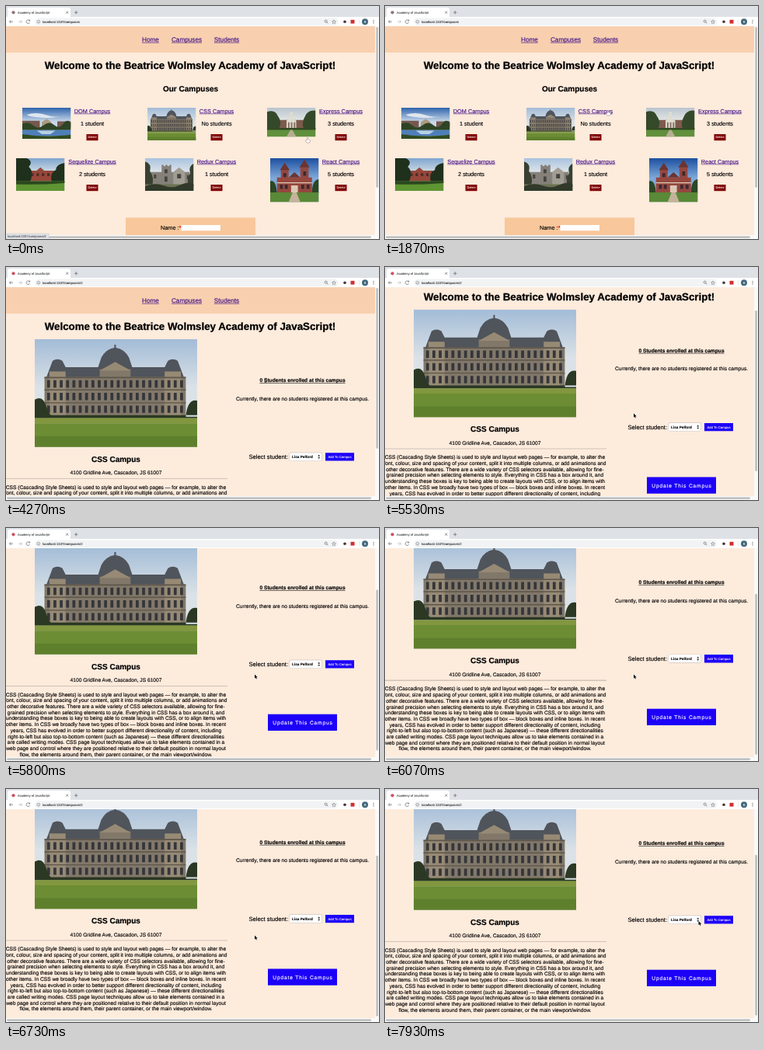
Write an HTML page with a canvas that moves like this. It is 480 px wide and 300 px high and loops after 8 s.

```html
<!DOCTYPE html>
<html lang="en">
<head>
<meta charset="utf-8">
<title>Academy of JavaScript</title>
<style>
html, body { margin: 0; width: 100%; height: 100%; overflow: hidden; }
canvas { display: block; width: 480px; height: 300px; }
</style>
</head>
<body>
<canvas id="stage"></canvas>
<script>
const LOOP = 8000;
const canvas = document.getElementById('stage');
const ctx = canvas.getContext('2d');
const ratio = window.devicePixelRatio || 1;
canvas.width = 480 * ratio;
canvas.height = 300 * ratio;

const PEACH = '#fdebdc', HEADER = '#f8d0af', LINK = '#45148a', BLUE = '#1c00f8';
const VIEW = { top: 26, right: 475, bottom: 295 };

// ---------- helpers ----------
function rect(color, x, y, w, h, radius = 0) {
  ctx.fillStyle = color;
  ctx.beginPath();
  ctx.roundRect(x, y, w, h, radius);
  ctx.fill();
}

function circle(color, x, y, r) {
  ctx.fillStyle = color;
  ctx.beginPath();
  ctx.arc(x, y, r, 0, 7);
  ctx.fill();
}

function line(path, color = '#5f6368', width = 0.7) {
  ctx.strokeStyle = color;
  ctx.lineWidth = width;
  ctx.stroke(new Path2D(path));
}

// y is the middle of the capital letters; a hairline stroke gives the heavier smoothing
function text(str, x, y, size, { color = '#000', bold, align = 'center', underline, spacing = 0 } = {}) {
  ctx.font = `${bold ? 'bold ' : ''}${size}px "Liberation Sans", Arial, sans-serif`;
  ctx.letterSpacing = spacing + 'px';
  ctx.textAlign = align;
  ctx.fillStyle = ctx.strokeStyle = color;
  ctx.lineWidth = size * 0.02;
  const base = y + size * 0.36;
  ctx.fillText(str, x, base);
  ctx.strokeText(str, x, base);
  if (underline) {
    const w = ctx.measureText(str).width;
    ctx.fillRect(align === 'center' ? x - w / 2 : x, base + size * 0.1, w, size * 0.085);
  }
  ctx.letterSpacing = '0px';
}

const clamp = v => Math.min(1, Math.max(0, v));
const ease = v => v * v * (3 - 2 * v);
const between = (t, a, b) => ease(clamp((t - a) / (b - a)));

// ---------- photos, drawn in a 100 x 100 box ----------
const box = (x, y, w, h) => `M${x} ${y}h${w}v${h}h${-w}z`;

const scenes = {
  dom: { sky: ['#2f64ad', '#c9d8e8'], shapes: [
    ['#dfe6ee', 'M10 22Q30 12 50 24T95 20Q70 36 40 32T10 22'],
    ['#75584c', box(0, 42, 36, 22) + box(72, 44, 28, 20)],
    ['#ab9a80', 'M40 62V46L50 36L60 46V62z'],
    ['#2d4424', 'M0 52Q12 42 22 56T44 56T66 56T84 52T100 48V72H0z'],
    ['#4f7fb9', 'M0 72H100V88Q50 96 0 86z'],
    ['#b8cfe4', 'M30 74H68L58 85H40z'],
    ['#314b22', 'M0 85Q50 97 100 87V100H0z']] },
  express: { sky: ['#b9c5cf', '#e3e6e4'], shapes: [
    ['#7d5a4c', box(22, 42, 56, 30)],
    ['#dfdccf', 'M40 44L50 34L60 44V72H40z' + box(47, 14, 6, 22)],
    ['#836d62', box(43, 50, 3, 20) + box(49, 50, 3, 20) + box(55, 50, 3, 20)],
    ['#34492a', 'M0 14Q16 4 22 28Q32 48 24 74H0zM100 10Q84 6 78 30Q70 52 76 74H100z'],
    ['#61903d', box(0, 70, 100, 30)],
    ['#314922', box(0, 69, 100, 7)],
    ['#b6ae92', 'M48 76H52L60 100H40z']] },
  sequelize: { sky: ['#7ea5cf', '#d3dde5'], shapes: [
    ['#96473a', 'M26 70V38H42L50 28L58 38H78V70z'],
    ['#4d2b28', box(31, 46, 5, 9) + box(42, 46, 5, 9) + box(53, 46, 5, 9) + box(64, 46, 5, 9)],
    ['#1f301c', 'M0 0H22Q36 10 26 26Q38 42 28 74H0zM100 14Q82 18 82 36Q68 46 74 74H100z'],
    ['#5f9432', box(0, 70, 100, 30)],
    ['#2b481e', 'M0 70H100V76Q50 82 0 80z']] },
  redux: { sky: ['#a9c3df', '#e0e6ea'], shapes: [
    ['#85817a', 'M10 82V42H34V20H38V24H42V20H46V24H50V20H54V42H92V82z'],
    ['#a29d93', 'M58 82V42L70 28L82 42V82z'],
    ['#45443f', box(18, 50, 5, 12) + box(40, 34, 6, 12) + box(40, 56, 6, 16) + box(66, 48, 8, 14) + box(86, 52, 4, 12)],
    ['#394031', 'M0 10Q14 16 10 40Q20 60 14 88H0zM100 16Q88 26 93 46Q84 64 90 88H100z'],
    ['#6d7352', box(0, 80, 100, 20)],
    ['#30392a', 'M0 86Q20 74 38 84T72 82T100 80V100H0z']] },
  react: { sky: ['#1d4f9f', '#7ea9da'], shapes: [
    ['#95473e', box(14, 44, 72, 36) + box(22, 26, 16, 54) + box(62, 20, 17, 60)],
    ['#6c3431', 'M20 27L30 10L40 27zM60 21L70.5 3L81 21zM38 44L50 32L62 44z'],
    ['#dbc8b5', box(14, 55, 72, 2) + box(43, 62, 14, 18)],
    ['#3a2932', box(27, 34, 6, 9) + box(68, 30, 6, 10) + box(20, 60, 6, 10) + box(30, 60, 6, 10) + box(64, 60, 6, 10) + box(75, 60, 6, 10)],
    ['#2b4625', 'M0 52Q12 48 14 80H0zM100 48Q86 50 86 80H100z'],
    ['#5a8937', box(0, 78, 100, 22)],
    ['#c4b29a', 'M46 78H54L62 100H38z']] },
  css: { sky: ['#a3bcd7', '#dbe2e7'], shapes: [
    ['#50545b', 'M7 36L9 28L11 20Q14 17 17 20L19 26H39L41 17Q44 9 49 8V5H50V8Q55 9 58 17L60 26H80L82 20Q85 17 88 20L90 28L92 36z'],
    ['#82786a', box(6, 35, 87, 37) + box(40, 28, 19, 44)],
    ['#978a75', box(9, 30, 10, 41) + box(80, 30, 10, 41) + 'M40 29L49.5 21L59 29z'],
    ['#5d564b', box(6, 35, 87, 1.2) + box(6, 46.5, 87, 1) + box(6, 58.5, 87, 1)],
    ['#35363a', windows()],
    ['#2b3823', 'M0 56Q5 52 7 62T12 72H0zM100 57Q94 55 93 72H100z' + box(0, 70.5, 100, 2.8)],
    ['#82973f', box(0, 73.2, 100, 5)],
    ['#6c8d33', box(0, 78, 100, 22)],
    ['#5e802d', box(0, 90, 100, 10)]] }
};

function windows() {
  let path = '';
  for (let row = 0; row < 3; row++)
    for (let col = 0; col < 22; col++)
      path += box(7.6 + col * 3.9, 38 + row * 11.8, 1.8, 6.8);
  return path;
}

function photo(name, x, y, w, h) {
  const { sky, shapes } = scenes[name];
  ctx.save();
  ctx.translate(x, y);
  ctx.scale(w / 100, h / 100);
  ctx.beginPath();
  ctx.rect(0, 0, 100, 100);
  ctx.clip();
  const fill = ctx.createLinearGradient(0, 0, 0, 45);
  fill.addColorStop(0, sky[0]);
  fill.addColorStop(1, sky[1]);
  ctx.fillStyle = fill;
  ctx.fillRect(0, 0, 100, 100);
  for (const [color, path] of shapes) {
    ctx.fillStyle = color;
    ctx.fill(new Path2D(path));
  }
  ctx.restore();
}

// ---------- pages ----------
function pageTop() {
  rect(HEADER, 0, 26, VIEW.right, 34);
  const link = { color: LINK, underline: true };
  text('Home', 186, 43, 8.2, link);
  text('Campuses', 232.5, 43, 8.2, link);
  text('Students', 284, 43, 8.2, link);
  text('Welcome to the Beatrice Wolmsley Academy of JavaScript!', 237, 76.3, 13.33, { bold: true });
}

// name, students, scene, text centre, top, photo x, photo height
const campuses = [
  ['DOM', '1 student', 'dom', 111, 131, 21, 40],
  ['CSS', 'No students', 'css', 271, 131, 182, 42],
  ['Express', '3 students', 'express', 431, 131, 336, 37.5],
  ['Sequelize', '2 students', 'sequelize', 111, 196, 13, 42],
  ['Redux', '1 student', 'redux', 271, 196, 179, 42],
  ['React', '5 students', 'react', 431, 196, 340, 56.5]
];

function listPage() {
  pageTop();
  text('Our Campuses', 237.5, 106.2, 10, { bold: true });
  for (const [name, students, scene, x, y, left, height] of campuses) {
    photo(scene, left, y, 62.5, height);
    text(name + ' Campus', x, y + 4.2, 7.33, { color: LINK, underline: true });
    text(students, x, y + 20.2, 7.33);
    rect('#800000', x - 7.5, y + 34, 15, 8.2);
    text('Delete', x, y + 38.1, 3.8, { color: '#fff' });
  }
  rect('#f8c79b', 154, 272.5, 167, 40);
  text('Name :', 199, 285, 7.33, { align: 'left' });
  text('*', 222.7, 285, 7.33, { align: 'left', color: '#d00' });
  rect('#fff', 225.5, 282, 50.5, 7.2);
}

const paragraph = [
  'CSS (Cascading Style Sheets) is used to style and layout web pages — for example, to alter the',
  'font, colour, size and spacing of your content, split it into multiple columns, or add animations and',
  'other decorative features. There are a wide variety of CSS selectors available, allowing for fine-',
  'grained precision when selecting elements to style. Everything in CSS has a box around it, and',
  'understanding these boxes is key to being able to create layouts with CSS, or to align items with',
  'other items. In CSS we broadly have two types of box — block boxes and inline boxes. In recent',
  'years, CSS has evolved in order to better support different directionality of content, including',
  'right-to-left but also top-to-bottom content (such as Japanese) — these different directionalities',
  'are called writing modes. CSS page layout techniques allow us to take elements contained in a',
  'web page and control where they are positioned relative to their default position in normal layout',
  'flow, the elements around them, their parent container, or the main viewport/window.'
];

function campusPage() {
  pageTop();
  photo('css', 37, 93, 209, 138.7);
  text('CSS Campus', 141.5, 247, 10, { bold: true });
  text('4100 Gridline Ave, Cascadon, JS 61007', 141.5, 265, 6.67);
  rect('#a39b94', 0, 272, 285, 0.6);
  paragraph.forEach((row, i) => text(row, 141.5, 283.2 + i * 7.7, 6.67));

  text('0 Students enrolled at this campus', 381.5, 146, 6.67, { bold: true, underline: true });
  text('Currently, there are no students registered at this campus.', 381.5, 169.3, 6.67);
  text('Select student:', 312.5, 244, 7.65, { align: 'left' });
  rect('#b9b4b0', 364.6, 238.8, 42.2, 11, 1.8);
  rect('#fff', 365, 239.2, 41.4, 10.2, 1.5);
  text('Lisa Pelford', 368, 244.3, 4.7, { bold: true, align: 'left' });
  ctx.fillStyle = '#222';
  ctx.fill(new Path2D('M401.3 243.7L402.7 241.6L404.1 243.7zM401.3 245L402.7 247.1L404.1 245z'));
  rect(BLUE, 411, 239.2, 37, 10.4);
  text('Add To Campus', 429.5, 244.4, 4.25, { color: '#fff' });
  rect(BLUE, 337, 308.8, 89, 21.3);
  text('Update This Campus', 382, 319.5, 6.67, { color: '#fff', spacing: 0.83 });
}

// ---------- browser ----------
function browser(url, iconColor) {
  rect('#dee1e6', 0, 0, 480, 14);
  rect('#fff', 2, 2, 81, 14, 3);
  circle(iconColor, 9.5, 8.3, 2.1);
  text('Academy of JavaScript', 15, 8.3, 4, { align: 'left', color: '#3c4043' });
  line('M77.2 6.8l3 3m0-3l-3 3M88 8.3h4.4m-2.2-2.2v4.4');

  rect('#fff', 0, 14, 480, 12);
  rect('#f1f3f4', 37.5, 15.5, 390, 9.5, 4.7);
  line('M9 20.2H4.5m2-2l-2 2l2 2');
  line('M16 20.2h4.5m-2-2l2 2l-2 2', '#b4b7ba');
  line('M30.2 18.7a2.3 2.3 0 1 0 .4 2.3M30.7 17.4v1.7h-1.7');
  line('M43.7 20.2a1.9 1.9 0 1 1-3.8 0a1.9 1.9 0 1 1 3.8 0M41.8 20v1.2', '#5f6368', 0.5);
  text(url, 47, 20.2, 4.25, { align: 'left', color: '#202124' });
  line('M413.2 19.6a1.5 1.5 0 1 1-3 0a1.5 1.5 0 1 1 3 0M412.8 20.7l1.7 1.7');
  line('M422 17.9l.7 1.6l1.7.2l-1.3 1.2l.4 1.7l-1.5-.9l-1.5.9l.4-1.7l-1.3-1.2l1.7-.2z', '#5f6368', 0.5);
  circle('#4b3038', 436, 20.2, 1.8);
  rect('#d32f2f', 443.5, 17.8, 5, 4.8);
  rect('#d5d7da', 454, 17, 0.5, 6.5);
  circle('#44697d', 462, 20.2, 4);
  text('R', 462, 20.2, 3.8, { color: '#fff' });
  for (const y of [18.3, 20.2, 22.1]) circle('#5f6368', 473, y, 0.6);
}

function scrollbars(offset) {
  rect('#fafafa', VIEW.right, VIEW.top, 5, 274);
  rect('#fafafa', 0, VIEW.bottom, 480, 5);
  rect('#c1c1c1', 476.2, 27 + offset * 0.76, 2.8, 207, 1.4);
  rect('#c1c1c1', 1, 296.2, 469, 2.8, 1.4);
}

function status(url) {
  rect('#c8cbd0', 0, 292.7, 55.5, 8);
  rect('#dee1e6', 0, 293.2, 55, 7);
  text(url, 2, 296.7, 4.1, { align: 'left', color: '#4d5156' });
}

// ---------- motion ----------
const cursorStops = [
  [70, 388, 170], [530, 384, 174], [1330, 308, 150], [1870, 287, 135],
  [3130, 287, 135], [3930, 334, 146], [4300, 334, 146], [4870, 319, 176],
  [5000, 320, 188.5], [7400, 320, 188.5], [7930, 403.5, 170]
];

function cursorAt(t) {
  const next = cursorStops.findIndex(stop => stop[0] > t);
  if (next === 0) return cursorStops[0].slice(1);
  if (next < 0) return cursorStops.at(-1).slice(1);
  const [t0, x0, y0] = cursorStops[next - 1], [t1, x1, y1] = cursorStops[next];
  const k = between(t, t0, t1);
  return [x0 + (x1 - x0) * k, y0 + (y1 - y0) * k];
}

function cursorShape(t) {
  if (t < 600 || (t >= 1750 && t < 2270)) return 'hand';
  return t >= 3900 && t < 4450 ? 'beam' : 'arrow';
}

function drawCursor(t) {
  const [x, y] = cursorAt(t), shape = cursorShape(t);
  ctx.save();
  ctx.translate(x, y);
  ctx.lineJoin = 'round';
  if (shape === 'beam') {
    line('M-1.3-2.8Q0-2.8 0-2V2Q0 2.8-1.3 2.8M1.3-2.8Q0-2.8 0-2M0 2Q0 2.8 1.3 2.8', '#222', 0.6);
  } else {
    const hand = shape === 'hand';
    const path = new Path2D(hand
      ? 'M-.6 0Q0-.7.6 0V2L3 2.6Q3.5 3 3.3 4L2.5 5.8H-.8L-2.6 3.4Q-2.3 2.6-.6 3.6z'
      : 'M0 0V5.2L1.2 4.1L2 6L2.9 5.6L2.1 3.8H3.7z');
    ctx.fillStyle = hand ? '#fff' : '#000';
    ctx.strokeStyle = hand ? '#000' : '#fff';
    ctx.lineWidth = hand ? 0.5 : 0.9;
    ctx.stroke(path);
    ctx.fill(path);
  }
  ctx.restore();
}

function scrollAt(t) {
  const start = 5407;
  if (t < start) return 0;
  return 78.3 * (1 - Math.exp((start - t) / 185)) - 2.3 * between(t, 6400, 7130);
}

function draw(t) {
  const opened = t >= 2270, offset = scrollAt(t);
  ctx.setTransform(ratio, 0, 0, ratio, 0, 0);
  ctx.textRendering = 'geometricPrecision';
  ctx.lineJoin = 'round';
  rect(PEACH, 0, 0, 480, 300);

  ctx.save();
  ctx.beginPath();
  ctx.rect(0, VIEW.top, VIEW.right, VIEW.bottom - VIEW.top);
  ctx.clip();
  ctx.translate(0, -offset);
  opened ? campusPage() : listPage();
  ctx.restore();

  scrollbars(offset);
  browser('localhost:1337/campuses' + (opened ? '/2' : ''), t < 4000 ? '#8f7378' : '#cf4f5c');
  if (t < 800) status('localhost:1337/campuses/3');
  else if (t >= 1930 && !opened) status('localhost:1337/campuses/2');
  drawCursor(t);
}

const start = performance.now();
function tick() {
  draw((performance.now() - start) % LOOP);
  requestAnimationFrame(tick);
}
tick();
</script>
</body>
</html>
```
